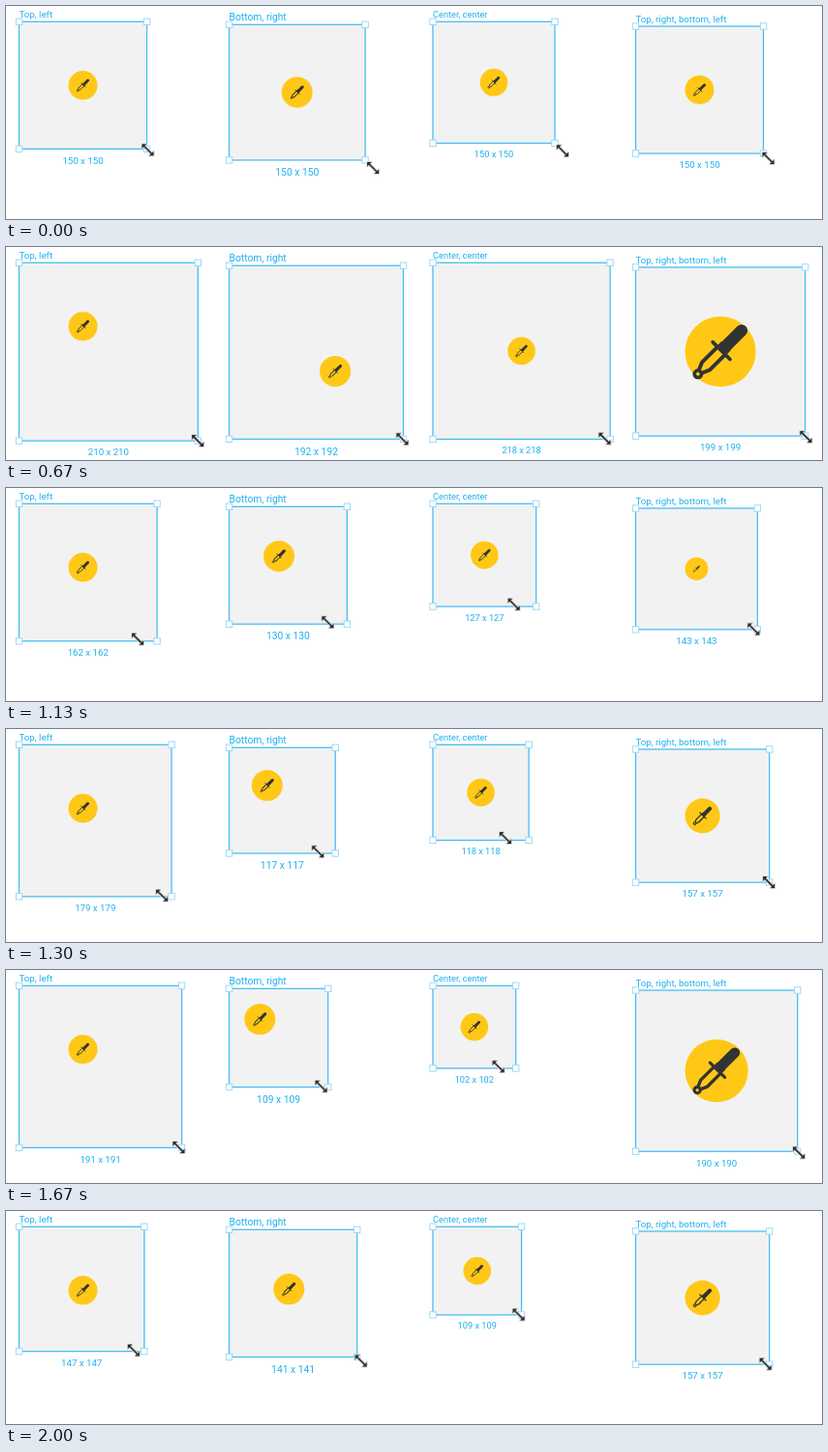
Recreate the animation shown at these times as an HTML page. Size 843 by 221 pixels, loop 2030 ms.

```html
<!DOCTYPE html>
<html lang="en">
<head>
<meta charset="utf-8">
<title>Resize constraints</title>
<style>
html, body { margin: 0; width: 100%; height: 100%; overflow: hidden; background: #fff; }
svg { display: block; width: 843px; height: 221px; }
text { font-family: Roboto, sans-serif; fill: #1eb0ee; }
.box { fill: #f2f2f2; stroke: #40bcf4; stroke-width: 1.25; }
.handle { fill: #fff; stroke: #9bdaf8; stroke-width: 1; }
.disc { fill: #ffc816; }
</style>
</head>
<body>
<svg id="stage" viewBox="0 0 843 221">
  <defs>
    <g id="dropper" transform="rotate(-45)" fill="none" stroke="#333">
      <path d="M.25 0H1.1" stroke-width=".44" stroke-linecap="round"/>
      <path d="M.05-.24H.3V.24H.05Z" fill="#333" stroke="none"/>
      <path d="M.05-.45V.45" stroke-width=".13" stroke-linecap="round"/>
      <path d="M.05-.2H-.76L-1.04-.08M.05 .2H-.76L-1.04 .08" stroke-width=".14"/>
      <circle cx="-1.17" r=".13" stroke-width=".13"/>
    </g>
    <path id="arrow" d="M-6-6H-1.5L-3.2-4.3 4.3 3.2 6 1.5V6H1.5L3.2 4.3-4.3-3.2-6-1.5Z"
      fill="#2b2b2b" stroke="#d0d0d0" stroke-width="1.8" stroke-linejoin="round" paint-order="stroke"/>
  </defs>
</svg>
<script>
const LOOP = 2030;
const REST = 7;        // steps before the drag sets off
const FIRST_PULL = .8; // how far the first small tug goes

// size: key points [step, size]; lead: key points [step, pointer ahead of corner]
const panels = [
  { label: "Top, left", x: 13.5, y: 16.3, scale: .88,
    size: [[1, 150], [4, 176], [13, 210], [27, 162], [37, 201], [43, 191], [53, 147]],
    lead: [[1, 1], [4, 13], [27, -20], [37, 2], [48, -11]],
    icon: () => ({ c: 66, r: 15 }) },
  { label: "Bottom, right", x: 230.5, y: 19.3, scale: .9375,
    size: [[0, 150], [4, 177], [13, 192], [27, 130], [37, 109], [43, 109], [53, 141]],
    lead: [[0, 8], [13, -1], [27, -20], [53, 4]],
    icon: w => ({ c: w - 70.4, r: 16 }) },
  { label: "Center, center", x: 441, y: 16.3, scale: .84,
    size: [[0, 150], [4, 192], [13, 218], [27, 127], [37, 116], [43, 102], [53, 109]],
    lead: [[4, 8], [27, -23], [43, -18], [53, -3]],
    icon: w => ({ c: w / 2, r: 14.3 }) },
  { label: "Top, right, bottom, left", x: 650.5, y: 21, scale: .88,
    size: [[0, 150], [4, 178], [13, 199], [27, 143], [37, 180], [43, 190], [53, 157]],
    lead: [[4, 5], [27, -4], [37, 3], [53, -4]],
    icon: w => ({ c: w / 2, r: w / 2 - 51, h: w / 2 - 59.5 }) }
];

function set(el, attrs) {
  for (const name in attrs) el.setAttribute(name, attrs[name]);
}

function add(parent, tag, attrs) {
  const el = document.createElementNS("http://www.w3.org/2000/svg", tag);
  set(el, attrs);
  return parent.appendChild(el);
}

// Smooth curve through key points, held beyond both ends
function curve(points, x) {
  const last = points.length - 1;
  x = Math.min(Math.max(x, points[0][0]), points[last][0]);
  const slope = i => {
    const a = points[Math.max(i - 1, 0)], b = points[Math.min(i + 1, last)];
    return (b[1] - a[1]) / (b[0] - a[0]);
  };
  let i = 0;
  while (i < last - 1 && x > points[i + 1][0]) i++;
  const [x0, y0] = points[i], [x1, y1] = points[i + 1];
  const d = x1 - x0, u = (x - x0) / d, v = 1 - u;
  return v * v * ((1 + 2 * u) * y0 + u * d * slope(i)) +
         u * u * ((1 + 2 * v) * y1 - v * d * slope(i + 1));
}

function build(p) {
  const g = add(stage, "g", { transform: `translate(${p.x} ${p.y})` });
  const font = 11 * p.scale;
  p.box = add(g, "rect", { class: "box" });
  p.disc = add(g, "circle", { class: "disc" });
  p.dropper = add(g, "use", { href: "#dropper" });
  add(g, "text", { y: -4.8 * p.scale, "font-size": font }).textContent = p.label;
  p.text = add(g, "text", { "font-size": font, "text-anchor": "middle" });
  p.handles = [0, 1, 2, 3].map(() =>
    add(g, "rect", { class: "handle", width: 6.4, height: 6.4 }));
  p.arrow = add(g, "use", { href: "#arrow" });
}

function update(p, step) {
  const size = Math.round(curve(p.size, step));
  const w = size * p.scale;
  const { c, r, h = r * .435 } = p.icon(w);
  set(p.box, { width: w, height: w });
  set(p.disc, { cx: c, cy: c, r });
  set(p.dropper, { transform: `translate(${c} ${c}) scale(${h})` });
  set(p.text, { x: w / 2, y: w + 17.4 * p.scale });
  p.text.textContent = `${size} x ${size}`;
  p.handles.forEach((el, i) =>
    set(el, { x: (i & 1) * w - 3.2, y: (i >> 1) * w - 3.2 }));

  // The square follows the farther pointer axis, so only x falls far behind
  const dx = curve(p.lead, step);
  const dy = dx > 0 ? dx : dx * .1;
  set(p.arrow, { transform: `translate(${w + dx} ${w + dy})` });
}

function tick() {
  const t = performance.now() % LOOP;
  const frame = Math.floor((t + 3.4) * .03); // thirty steps a second
  const step = frame && Math.max(FIRST_PULL, frame - REST);
  panels.forEach(p => update(p, step));
  requestAnimationFrame(tick);
}

const stage = document.getElementById("stage");
panels.forEach(build);
tick();
</script>
</body>
</html>
```
